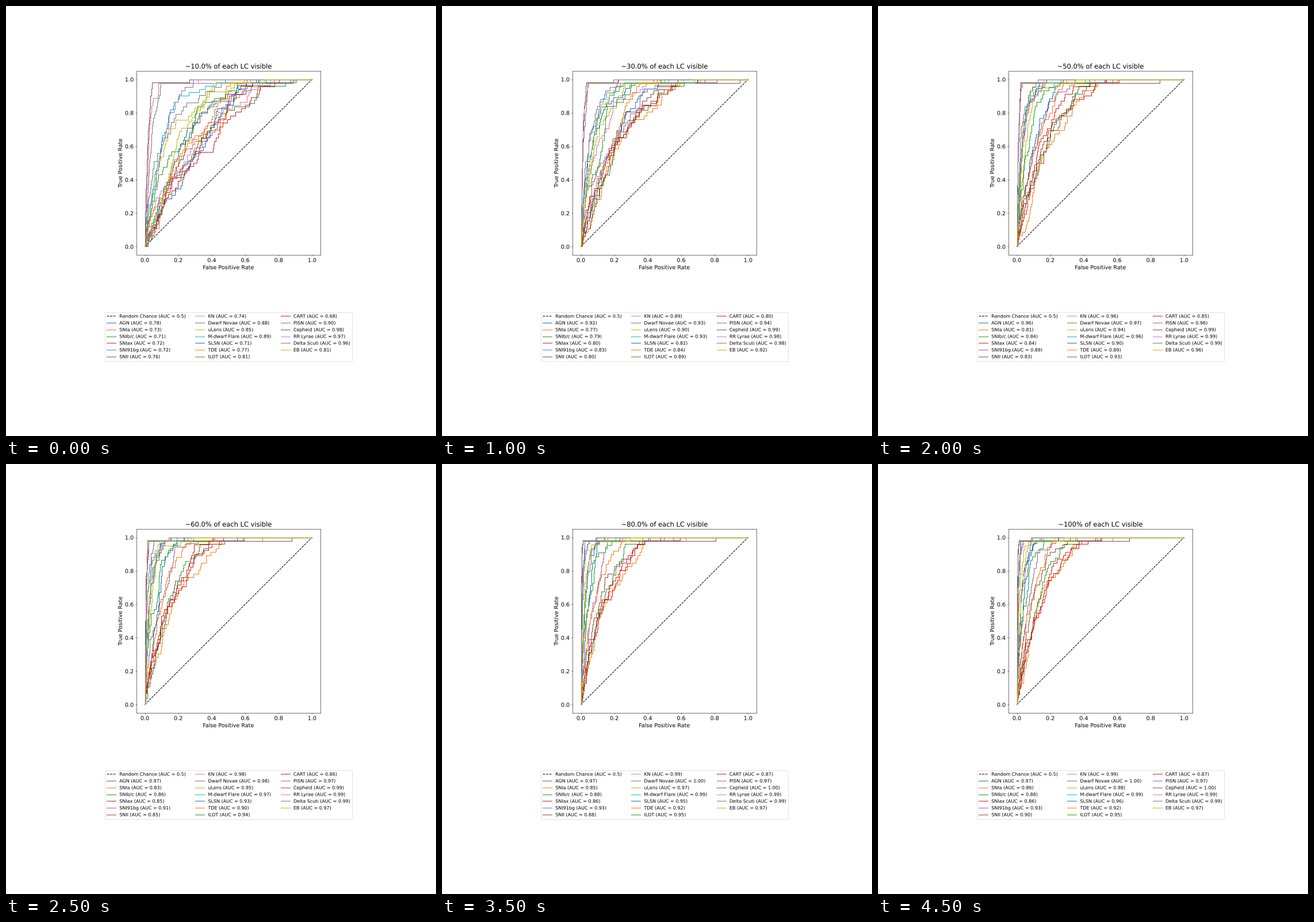
Write a matplotlib script that moves like this. It is 748 px wide and 748 px high and loops after 5000 ms.

```python
import numpy as np
import matplotlib.pyplot as plt
from matplotlib.animation import FuncAnimation
from matplotlib.patheffects import Normal
from matplotlib.text import Text

STEPS = 10
MIDDLE = 4
SIZE = 748

# AUC in percent at the first, middle and last step
AUC = {
    "AGN": (78, 96, 97), "SNIa": (73, 81, 86), "SNIb/c": (71, 84, 88),
    "SNIax": (72, 84, 86), "SNI91bg": (72, 89, 93), "SNII": (76, 83, 90),
    "KN": (74, 96, 99), "Dwarf Novae": (88, 97, 100), "uLens": (85, 94, 98),
    "M-dwarf Flare": (89, 96, 99), "SLSN": (71, 90, 96), "TDE": (77, 89, 92),
    "ILOT": (81, 93, 95), "CART": (68, 85, 87), "PISN": (90, 96, 97),
    "Cepheid": (98, 99, 100), "RR Lyrae": (97, 99, 99),
    "Delta Scuti": (96, 99, 99), "EB": (81, 96, 97),
}


def auc_at(name, step):
    """Ease out from first to last value, as sharply as the middle demands."""
    first, middle, last = AUC[name]
    left = max((last - middle) / (last - first), 0.05)
    power = np.log(left) / np.log(1 - MIDDLE / (STEPS - 1))
    ease = 1 - (1 - step / (STEPS - 1)) ** power
    return (first + (last - first) * ease) / 100


def roc(name, index, step):
    """Random staircase along y = 1 - (1 - x / reach) ** b, fitted to the AUC."""
    base = np.random.default_rng(100 + index)
    fresh = np.random.default_rng(1000 + 50 * index + step)
    n = int(base.integers(41, 60))
    tail = base.uniform(0.95, 1.4)
    u = np.sort(np.r_[base.random(n // 2), fresh.random(n - n // 2)])
    u[-1] = 1
    miss = max(1 - auc_at(name, step), 0.004)
    reach = min(1.2 * np.sqrt(miss) * tail, 0.94)
    b = max(reach / miss - 1, 1)
    x = (1 - (1 - u) ** (1 / b)) ** 1.15
    x = np.minimum(x * miss / x.mean(), 0.95)
    return np.r_[0, x, 1], np.r_[0, np.arange(1, n + 1) / n, 1]


def label_at(name, step):
    return f"{name} (AUC = {auc_at(name, step):.2f})"


plt.rcParams.update({"font.family": "DejaVu Sans", "font.size": 13.8,
                     "text.hinting": "none"})
fig = plt.figure(figsize=(14.96, 14.96), dpi=50, facecolor="white")
ax = fig.add_axes([227 / SIZE, 315 / SIZE, 320 / SIZE, 320 / SIZE])
ax.set(xlim=(-0.05, 1.05), ylim=(-0.05, 1.05),
       xlabel="False Positive Rate", ylabel="True Positive Rate")
ticks = np.linspace(0, 1, 6)
ax.set_xticks(ticks)
ax.set_yticks(ticks)
title = ax.set_title("~10.0% of each LC visible")

ax.plot([0, 1], [0, 1], "k--", label="Random Chance (AUC = 0.5)")
curves = [ax.plot([], [], color=f"C{i % 10}", drawstyle="steps-post",
                  label=label_at(name, 0))[0]
          for i, name in enumerate(AUC)]
legend = ax.legend(loc="upper center", bbox_to_anchor=(0.5, -0.3), ncol=3,
                   fontsize="small")
labels = legend.get_texts()[1:]

# Drawing text as outlines keeps its position free of pixel rounding
for text in fig.findobj(Text):
    text.set_path_effects([Normal()])


def draw(step):
    share = "100" if step == STEPS - 1 else f"{10 * (step + 1):.1f}"
    title.set_text(f"~{share}% of each LC visible")
    for i, name in enumerate(AUC):
        curves[i].set_data(*roc(name, i, step))
        labels[i].set_text(label_at(name, step))
    return [title, *curves, *labels]


anim = FuncAnimation(fig, draw, frames=STEPS, interval=500, repeat=True,
                     repeat_delay=0, blit=False)
plt.show()
```
